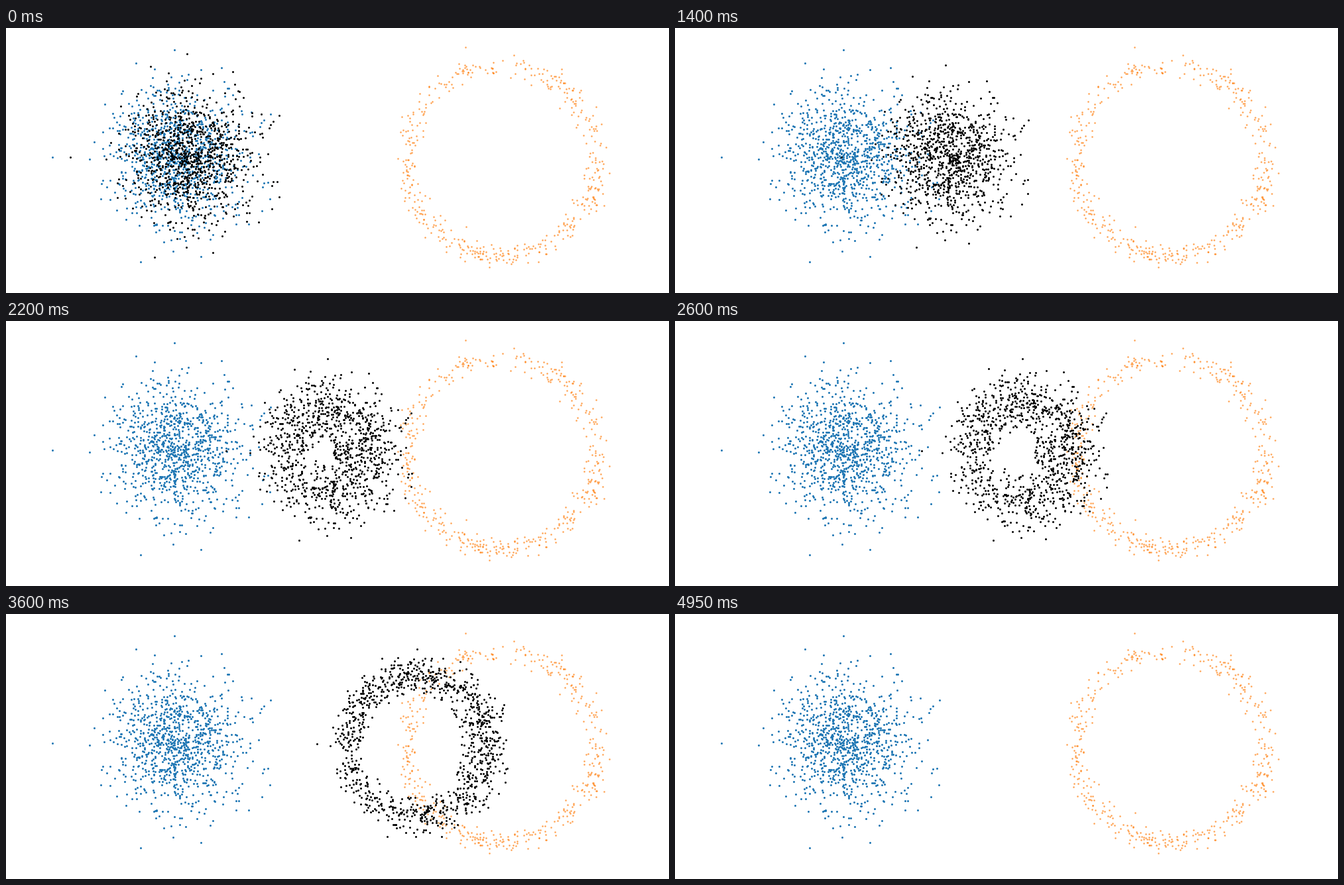
Recreate the animation shown at these times as a matplotlib script. Size 1000 by 400 pixels, loop 5000 ms.

```python
import numpy as np
import matplotlib.pyplot as plt
from matplotlib.animation import FuncAnimation

W, H, DPI = 1000, 400, 100
FRAMES, INTERVAL = 100, 50
CLOUD, CLOUD_SD, CLOUD_COUNT = np.array([256, 198]), 49, 1000
RING, RADIUS, RING_SD, RING_COUNT = np.array([747, 199]), 144, 8.6, 470
LEAD = 0.04  # share of the way already covered in the first frame
EXTREMES = [(69, 194), (253, 32), (195, 52), (398, 129), (397, 257), (202, 352)]

rng = np.random.default_rng(7)


def make_cloud(limit=155):
    offsets = rng.normal(0, CLOUD_SD, (2 * CLOUD_COUNT, 2))
    offsets = offsets[np.hypot(*offsets.T) < limit]
    return np.vstack([EXTREMES, CLOUD + offsets[:CLOUD_COUNT - len(EXTREMES)]])


def make_ring():
    angle = rng.uniform(0, 2 * np.pi, RING_COUNT)
    r = rng.normal(RADIUS, RING_SD, RING_COUNT)
    return RING + np.column_stack([r * np.cos(angle), r * np.sin(angle)])


cloud, ring = make_cloud(), make_ring()

# Reference population that gives the radial distribution at any time.
N = 60000
quantile = (np.arange(N) + 0.5) / N
ref_r = CLOUD_SD * np.sqrt(-2 * np.log(quantile))
ref_angle = np.pi * (np.sqrt(5) - 1) * np.arange(N)
ref_x, ref_y = ref_r * np.cos(ref_angle), ref_r * np.sin(ref_angle)
ref_ring = rng.normal(RADIUS, RING_SD, N)

offset = cloud - CLOUD
start_r = np.hypot(*offset.T)
rank = 1 - np.exp(-start_r ** 2 / (2 * CLOUD_SD ** 2))
core = np.exp(-(start_r / 70) ** 2)


def flow(t):
    """Carry the cloud to the ring, keeping each point's radial quantile."""
    radii = np.sort(np.hypot((1 - t) * ref_x + t * ref_ring, (1 - t) * ref_y))
    r = np.interp(rank, quantile, radii) * (1 - LEAD * (1 - t) ** 3)
    # Points near the middle lean towards the ring as the hole opens.
    lean = np.outer(10 * min(1, 2 * t) * core, [1, 0])
    heading = offset + lean
    heading /= np.hypot(*heading.T)[:, None]
    progress = LEAD + (1 - LEAD) * t
    center = CLOUD + progress * (RING - CLOUD)
    return center + heading * r[:, None]


fig = plt.figure(figsize=(W / DPI, H / DPI), dpi=DPI, facecolor="white")
ax = fig.add_axes([0, 0, 1, 1])
ax.set(xlim=(-0.5, W - 0.5), ylim=(H - 0.5, -0.5))
ax.axis("off")


def dots(points, diameter, color, **style):
    size = (diameter * 72 / DPI) ** 2
    return ax.scatter(*points.T, s=size, color=color, linewidths=0, **style)


dots(cloud, 3, "tab:blue", zorder=1)
dots(ring, 2.6, "tab:orange", alpha=0.7, zorder=2)
moving = dots(cloud, 3, "black", zorder=3)


def update(frame):
    last = FRAMES - 1
    moving.set_visible(frame < last)
    if frame < last:
        moving.set_offsets(flow(frame / (last - 1)))
    return [moving]


anim = FuncAnimation(fig, update, frames=FRAMES, interval=INTERVAL,
                     init_func=lambda: update(0), repeat=True, repeat_delay=0)
plt.show()
```
